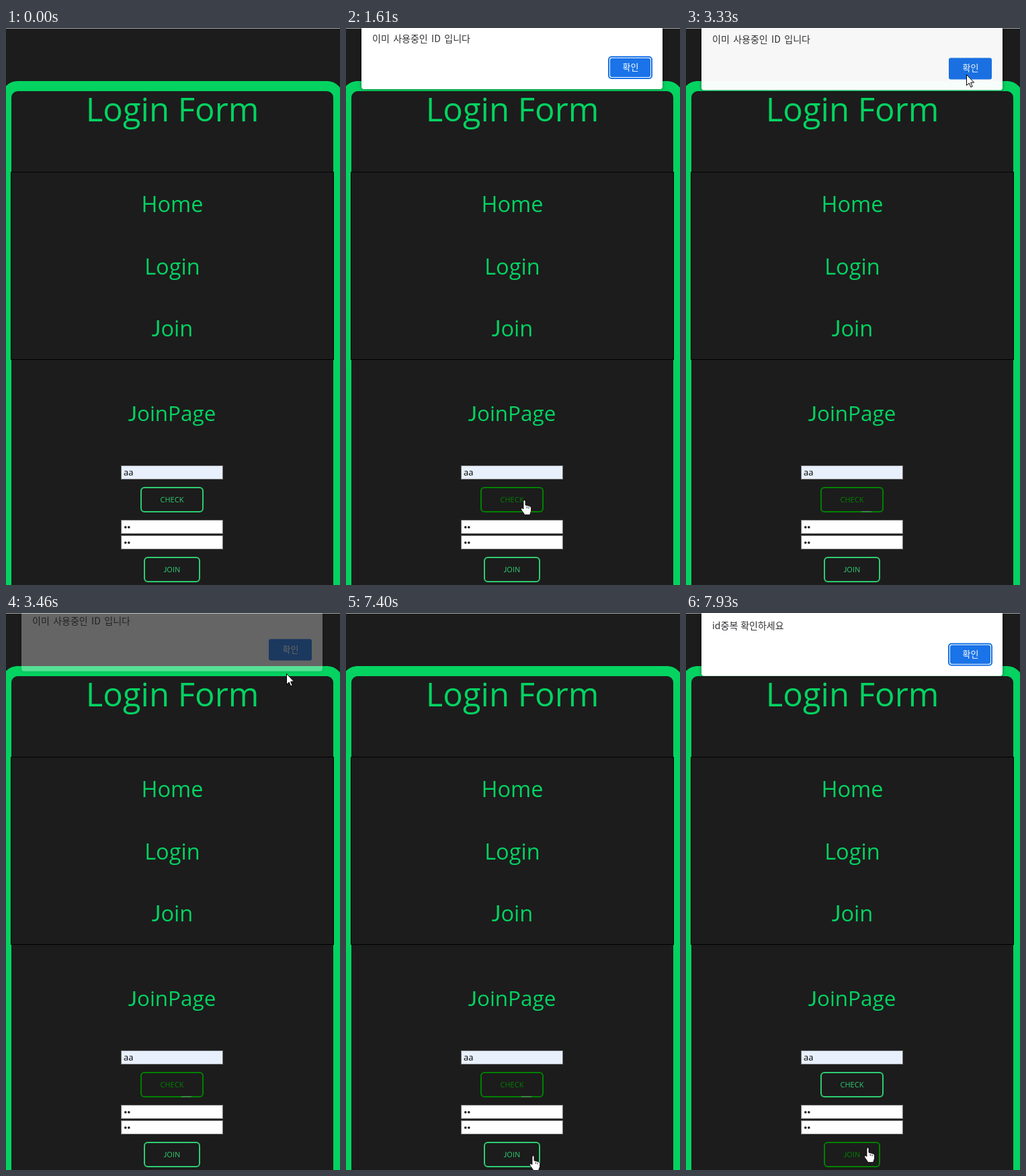
Recreate the animation shown at these times as an HTML page. Size 497 by 829 pixels, loop 8 s.

```html
<!DOCTYPE html>
<html lang="ko">
<head>
<meta charset="utf-8">
<title>Login Form</title>
<style>
  html, body { margin: 0; width: 100%; height: 100%; overflow: hidden; background: #1c1c1c; }
  svg { display: block; }
  text { font-family: "Open Sans", "Noto Sans", sans-serif; }
  .mid { text-anchor: middle; }
  .j { font-family: Lato, sans-serif; }
  .dialog text { font-family: "Noto Sans CJK KR", "Noto Sans CJK", sans-serif; }
  .panel { filter: drop-shadow(0 0 2.5px rgba(0, 0, 0, .5)); }
</style>
</head>
<body>
<svg width="497" height="829" viewBox="0 0 497 829">
  <rect width="497" height="829" fill="#1c1c1c"/>
  <rect width="497" height="1" fill="#a4a6a8"/>
  <rect x=".5" y="86.5" width="494" height="900" rx="17" fill="none" stroke="#04d361" stroke-width="15"/>
  <rect x="7.5" y="214.5" width="480" height="279" fill="#1c1c1c" stroke="#000"/>
  <g id="page" fill="#04d361"></g>
  <g id="check"></g>
  <g id="join"></g>
  <rect id="trace" x="261" y="719" width="15" height="1.5" fill="#4d8a5c"/>
  <g id="dialog" class="dialog">
    <rect class="panel" x="23" y="-40" width="448" height="135" rx="4" fill="#fff"/>
    <text id="message" x="39" y="25" font-size="14" fill="#303134"></text>
    <rect id="ring" x="391" y="47" width="64" height="32" rx="4" fill="none" stroke="#1a73e8" stroke-width="2"/>
    <rect id="ok" rx="3"/>
    <text class="mid" x="423.5" y="67" font-size="13" fill="#fff">확인</text>
  </g>
  <g id="cursor" fill="#fff" stroke="#000" stroke-linejoin="round">
    <path id="arrow" d="M.5.5V16.5L4.2 13 6.8 19 9.2 18 6.7 12.1H11.6Z"/>
    <g id="hand" stroke-width=".8">
      <path d="M4 1.8Q5.5-.4 7 1.8V8L13 9.5Q15.5 10 15.5 12.5V17L13.5 22.6H6L.8 15Q0 13 2 12.4L4 14Z"/>
      <path d="M9.2 10V13M12 10.6V13.5" fill="none"/>
    </g>
  </g>
</svg>
<script>
const LOOP = 8000;
const $ = id => document.getElementById(id);
const clamp = v => Math.min(1, Math.max(0, v));
const lerp = (a, b, k) => a + (b - a) * k;
const show = (node, on) => node.setAttribute('display', on ? 'inline' : 'none');
const set = (node, attrs) => { for (const k in attrs) node.setAttribute(k, attrs[k]); };

const label = (text, x, y, size) =>
  `<text class="mid" x="${x}" y="${y}" font-size="${size}">${text.replace(/J/g, '<tspan class="j">J</tspan>')}</text>`;
const input = (y, fill) =>
  `<rect x="171.5" y="${y + .5}" width="151" height="20" fill="${fill}" stroke="#767676"/>`;
const dots = y => [177.8, 182.8].map(x => `<circle cx="${x}" cy="${y}" r="1.8" fill="#111"/>`).join('');
const button = (text, x, y, w) =>
  `<rect x="${x + 1}" y="${y + 1}" width="${w - 2}" height="36" rx="5" fill="none" stroke-width="2"/>`
  + label(text, x + w / 2, y + 23, 11);

$('page').innerHTML =
  label('Login Form', 247.5, 139, 49) +
  label('Home', 247.5, 274, 32.5) +
  label('Login', 247.5, 367, 32.5) +
  label('Join', 247.5, 459, 32.5) +
  label('JoinPage', 247, 585, 31.4) +
  input(651, '#e8f0fe') + '<text x="175" y="666" font-size="13" fill="#000">aa</text>' +
  input(732, '#fff') + dots(743) +
  input(755, '#fff') + dots(766);
$('check').innerHTML = button('CHECK', 200, 683, 94);
$('join').innerHTML = button('JOIN', 205, 787, 84);

// Pointer legs: start, end, steps, shape, from x, y, to x, y
const legs = [
  [70, 330, 1, 'arrow', 424, 827, 424, 827],
  [330, 540, 4, 'arrow', 390, 802, 271, 722],
  [740, 940, 4, 'hand', 264, 719, 260, 702],
  [1820, 2020, 1, '', 0, 0, 0, 0],
  [2020, 2580, 9, 'arrow', 349, 510, 417, 71],
  [2840, 3400, 1, 'arrow', 417, 69, 417, 69],
  [3400, 3850, 8, 'arrow', 417, 90, 408, 771],
  [4050, 4250, 4, 'arrow', 408, 785, 408, 832],
  [4250, 7400, 1, '', 0, 0, 0, 0],
  [7400, 7460, 2, 'hand', 273, 807, 269, 801],
  [7660, 7930, 1, 'hand', 265, 795, 265, 795],
];

function drawCursor(t) {
  const leg = legs.filter(l => l[0] <= t).pop();
  const [start, end, n, shape, x0, y0, x1, y1] = leg || [0, 1, 1, '', 0, 0, 0, 0];
  const k = n > 1 ? Math.floor(clamp((t - start) / (end - start)) * (n - 1) + 1e-6) / (n - 1) : 0;
  show($('arrow'), shape === 'arrow');
  show($('hand'), shape === 'hand');
  set($('cursor'), { transform: `translate(${lerp(x0, x1, k)} ${lerp(y0, y1, k)})` });
}

function tint(id, k) {
  const color = `rgb(${[[46, 0], [204, 128], [113, 0]].map(([a, b]) => Math.round(lerp(a, b, k)))})`;
  set($(id), { stroke: color, fill: color });
  $(id).querySelector('text').setAttribute('stroke', 'none');
}

function drawDialog(t) {
  const second = t >= 7660;
  const age = Math.floor((t - (second ? 7660 : 1470)) / 70) * 70 + 10;
  const closing = !second && t >= 3170;
  let alpha = clamp((age - 5) / 145);
  let shift = -20 * (1 - clamp(age / 360)) ** 3;
  if (closing) {
    alpha = 1 - clamp((t - 3325) / 200);
    shift = -20 * clamp((t - 3170) / 450) ** 2;
  }
  show($('dialog'), age > 0 && alpha > 0);
  set($('dialog'), { opacity: alpha, transform: `translate(0 ${shift})` });
  $('message').textContent = second ? 'id중복 확인하세요' : '이미 사용중인 ID 입니다';
  set($('message'), { 'word-spacing': second ? 0 : 1.5 });
  show($('ring'), !closing);
  const hover = t >= 2510 && t < 3170;
  set($('ok'), closing
    ? { x: 391, y: 47, width: 64, height: 32, fill: '#1a73e8' }
    : { x: 393, y: 49, width: 60, height: 28, fill: hover ? '#2a7be9' : '#1a73e8' });
}

function draw(t) {
  const dim = t < 740 ? 0 : Math.min(1, (Math.floor((t - 740) / 66.6) + 1) / 4);
  tint('check', t >= 7660 ? 0 : dim);
  tint('join', t >= 7660 ? 1 : t >= 7460 ? .25 : 0);
  show($('trace'), t >= 1820 && t < 7660);
  drawDialog(t);
  drawCursor(t);
}

const begin = performance.now();
function tick() {
  draw((performance.now() - begin) % LOOP);
  requestAnimationFrame(tick);
}
tick();
</script>
</body>
</html>
```
